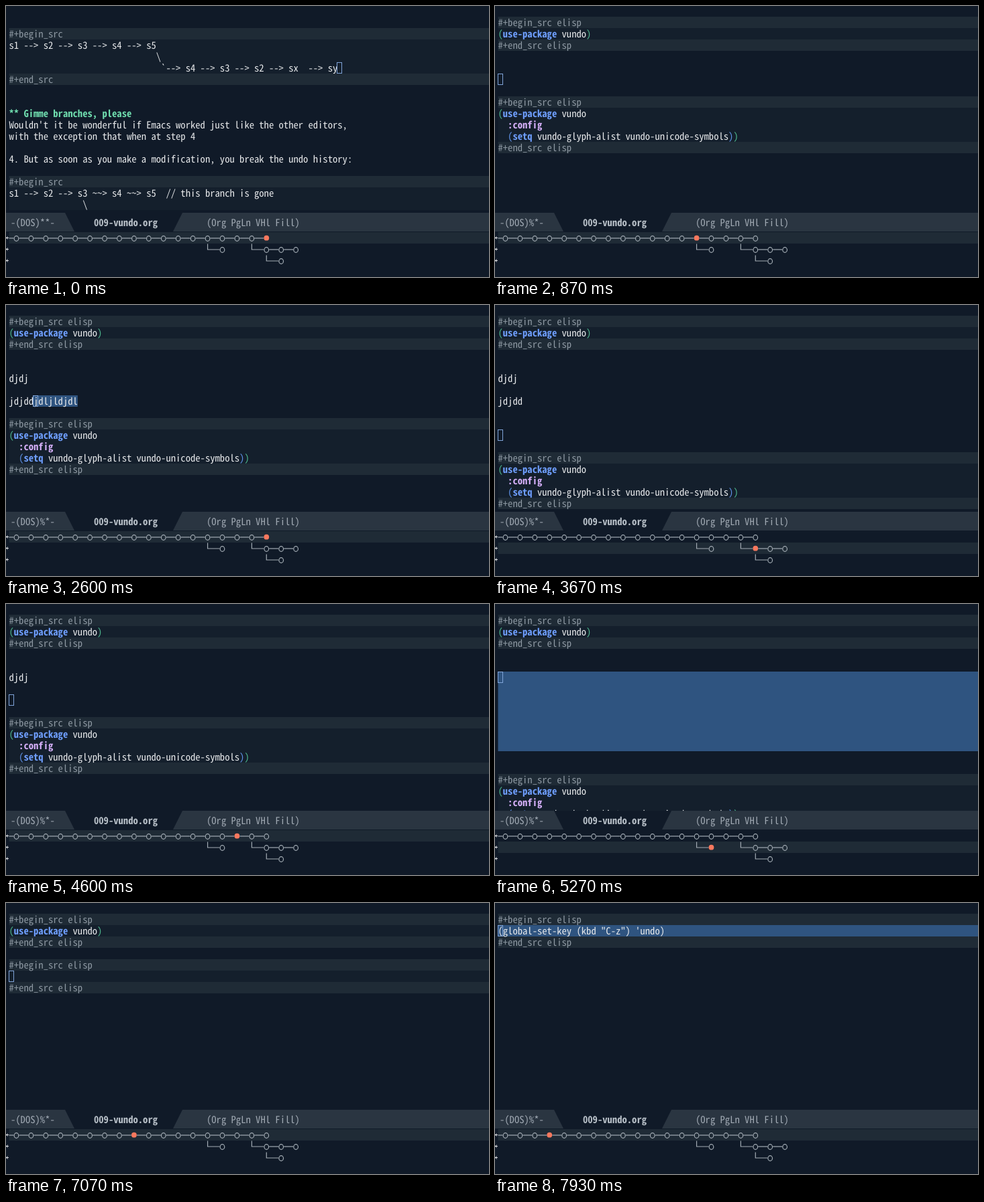
Write an HTML page with a canvas that moves like this. It is 720 px wide and 405 px high and loops after 8000 ms.

```html
<!DOCTYPE html>
<html lang="en">
<head>
<meta charset="utf-8">
<title>Undo tree</title>
<style>
  html, body { margin: 0; width: 100%; height: 100%; overflow: hidden; background: #101a28; }
  canvas { display: block; width: 720px; height: 405px; }
</style>
</head>
<body>
<canvas id="stage" width="720" height="405"></canvas>
<script>
const ctx = document.getElementById('stage').getContext('2d');
const LOOP = 8000, CHAR = 7.31, LEFT = 4.5, LINE = 17, TREE_TOP = 338;
const COLOR = {
  back: '#101a28', band: '#1f2b36', body: '#141f2c', mark: '#2f5480', bar: '#2a3541',
  text: '#e6e8ea', dim: '#8d98a2', label: '#a0a9b3', name: '#b8c0c8', head: '#6fdcae',
  keyword: '#6f9fff', option: '#d6b0fa', outer: '#4cb58c', inner: '#5f93e8',
  cursor: '#7fa3d8', line: '#a3acb4', current: '#f8785e'
};

// Size the font so that one cell is exactly CHAR wide.
const FAMILY = '"Noto Sans Mono CJK JP", "Noto Sans Mono CJK SC", "Noto Sans Mono", monospace';
ctx.font = `100px ${FAMILY}`;
const fontSize = 100 * CHAR / ctx.measureText('0').width;
ctx.textRendering = 'geometricPrecision';

const blank = n => Array(n).fill('');
const block = (...body) => ['#+begin_src elisp', ...body, '#+end_src elisp'];
const first = ['', ...block('(use-package vundo)')];
const config = block('(use-package vundo', '  :config',
  '  (setq vundo-glyph-alist vundo-unicode-symbols))');
const page = (...gap) => [...first, ...gap, ...config];

const intro = [
  '', '', '#+begin_src', 's1 --> s2 --> s3 --> s4 --> s5', ' '.repeat(30) + '\\',
  ' '.repeat(31) + '`--> s4 --> s3 --> s2 --> sx  --> sy', '#+end_src', '', '',
  '** Gimme branches, please',
  "Wouldn't it be wonderful if Emacs worked just like the other editors,",
  'with the exception that when at step 4', '',
  '4. But as soon as you make a modification, you break the undo history:', '',
  '#+begin_src', 's1 --> s2 --> s3 ~~> s4 ~~> s5  // this branch is gone', ' '.repeat(15) + '\\'
];
const spaced = page(...blank(4));
const oneWord = page('', '', 'djdj', '', '', '');
const twoWords = page('', '', 'djdj', '', 'jdjdd', '');
const longWord = page('', '', 'djdj', '', 'jdjddjdljldjdl', '');
const branch = page('', '', 'djdj', '', 'jdjdd', ...blank(4));
const branchMore = page('', '', 'djdj', '', 'jdjdd', ...blank(6));

// [start ms, tree column, tree row, lines, cursor [row, col], inserted region [row, col, row, col]]
const steps = [
  [0, 17, 0, intro, [5, 67]],
  [66, 16, 0, twoWords, [8, 5]],
  [268, 15, 0, oneWord, [8, 0]],
  [530, 14, 0, spaced, [6, 0]],
  [800, 13, 0, spaced, [6, 0]],
  [1130, 14, 0, spaced, [6, 0]],
  [1400, 15, 0, oneWord, [6, 4], [6, 0, 8, 0]],
  [1800, 16, 0, twoWords, [8, 0], [8, 0, 8, 5]],
  [2330, 17, 0, longWord, [8, 5], [8, 5, 8, 14]],
  [2800, 17, 1, branch, [8, 5], [8, 5, 11, 0]],
  [3070, 18, 1, branchMore, [11, 0], [11, 0, 13, 0]],
  [3470, 17, 1, branch, [11, 0]],
  [3870, 16, 0, twoWords, [8, 5]],
  [4270, 15, 0, oneWord, [8, 0]],
  [4870, 14, 0, spaced, [6, 0]],
  [5130, 14, 1, page(...blank(11)), [6, 0], [6, 0, 13, 0]],
  [5530, 13, 0, spaced, [6, 0]],
  [5870, 12, 0, page(...blank(2)), [4, 0]],
  [6300, 11, 0, page(''), [4, 0]],
  [6500, 10, 0, [...first, '', ...block('(use-package vundo', '  :config', '  )')], [8, 2]],
  [6700, 9, 0, [...first, '', ...block('(use-package vundo)')], [6, 18]],
  [6900, 8, 0, [...first, '', ...block('')], [6, 0]],
  [7100, 7, 0, first, [4, 0]],
  [7300, 6, 0, ['', ...block('(use-package )')], [2, 13]],
  [7500, 5, 0, ['', ...block('')], [2, 0]],
  [7700, 4, 0, ['', ...block()], [2, 0]],
  [7900, 3, 0, ['', ...block('(global-set-key (kbd "C-z") \'undo)')], [2, 0], [2, 0, 3, 0]]
];

const colX = col => LEFT + col * CHAR;
const rowY = row => row * LINE - 1;

function fill(color, x, y, w, h) {
  ctx.fillStyle = color;
  ctx.fillRect(x, y, w, h);
}

function write(text, x, baseline, color, bold) {
  ctx.font = `${bold ? 'bold ' : ''}${fontSize}px ${FAMILY}`;
  ctx.fillStyle = color;
  [...text].forEach((c, i) => c !== ' ' && ctx.fillText(c, x + i * CHAR, baseline));
}

function writeCode(text, baseline, depth) {
  let col = 0;
  for (const token of text.match(/use-package|setq|:config|[()]|[^():]/g) || []) {
    let color = COLOR.text, bold = false;
    if (token === '(') color = depth++ ? COLOR.inner : COLOR.outer;
    else if (token === ')') color = --depth ? COLOR.inner : COLOR.outer;
    else if (token === ':config') { color = COLOR.option; bold = true; }
    else if (token.length > 1) { color = COLOR.keyword; bold = true; }
    write(token, colX(col), baseline, color, bold);
    col += token.length;
  }
  return depth;
}

function drawMark([startRow, startCol, endRow, endCol]) {
  for (let row = startRow; row <= endRow; row++) {
    const x = colX(row === startRow ? startCol : 0);
    const right = row === endRow ? colX(endCol) : 720;
    if (right > x) fill(COLOR.mark, x, rowY(row), right - x, LINE);
  }
}

function drawBuffer(lines, cursor, mark) {
  const kinds = [];
  let inBlock = false;
  lines.forEach((text, row) => {
    const edge = text.startsWith('#+');
    if (edge) inBlock = text.startsWith('#+begin');
    kinds[row] = edge ? 'band' : inBlock ? 'body' : 'back';
    if (kinds[row] !== 'back') fill(COLOR[kinds[row]], LEFT, rowY(row), 720 - LEFT, LINE);
  });
  if (mark) drawMark(mark);

  let depth = 0;
  lines.forEach((text, row) => {
    const baseline = rowY(row) + 13.5;
    const marked = mark && row >= mark[0] && row < mark[2];
    if (kinds[row] === 'band') {
      depth = 0;
      write(text, LEFT, baseline, COLOR.dim);
    } else if (text.startsWith('** ')) write(text, LEFT, baseline, COLOR.head, true);
    else if (kinds[row] === 'body' && !marked) depth = writeCode(text, baseline, depth);
    else write(text, LEFT, baseline, COLOR.text);
  });

  ctx.strokeStyle = COLOR.cursor;
  ctx.lineWidth = 1;
  ctx.strokeRect(Math.round(colX(cursor[1])) - 0.5, rowY(cursor[0]) + 0.5, 7, LINE - 1);
}

function drawModeLine(status) {
  fill(COLOR.bar, 0, 309, 720, 28);
  ctx.fillStyle = COLOR.back;
  ctx.beginPath();
  ctx.moveTo(88, 309);
  ctx.lineTo(263, 309);
  ctx.lineTo(249, 337);
  ctx.lineTo(102, 337);
  ctx.fill();
  write(status, 7, 329, COLOR.label);
  write('009-vundo.org', 131, 329, COLOR.name, true);
  write('(Org PgLn VHl Fill)', 299, 329, COLOR.label);
}

function drawTree(currentCol, currentRow) {
  const nodeX = col => colX(3 * col + 1.5);
  const nodeY = row => TREE_TOP + LINE * (row + 0.5) + 0.5;
  const path = (...points) => {
    ctx.beginPath();
    points.forEach(([x, y]) => ctx.lineTo(x, y));
    ctx.stroke();
  };
  fill(COLOR.back, 0, 337, 720, 68);
  fill(COLOR.band, LEFT, TREE_TOP + currentRow * LINE, 720 - LEFT, LINE);

  // Each branch: [row, parent column, last column]; the trunk has no parent.
  for (const [row, parent, last] of [[0, -1, 17], [1, 13, 14], [1, 16, 19], [2, 17, 18]]) {
    const y = nodeY(row);
    ctx.strokeStyle = COLOR.line;
    ctx.lineWidth = 1.2;
    if (parent >= 0) path([nodeX(parent), y - 8.5], [nodeX(parent), y], [nodeX(parent + 1) - 4, y]);
    else path([LEFT, y], [nodeX(0) - 4, y]);
    for (let col = parent + 1; col <= last; col++) {
      if (col < last) path([nodeX(col) + 4, y], [nodeX(col + 1) - 4, y]);
      ctx.beginPath();
      ctx.ellipse(nodeX(col), y + 0.5, 3.3, 3.8, 0, 0, 2 * Math.PI);
      if (col === currentCol && row === currentRow) {
        ctx.beginPath();
        ctx.arc(nodeX(col), y - 0.3, 3.9, 0, 2 * Math.PI);
        ctx.fillStyle = COLOR.current;
        ctx.fill();
      } else ctx.stroke();
    }
  }
  ctx.strokeStyle = COLOR.text;
  ctx.lineWidth = 1;
  for (let row = 0; row < 3; row++) {
    const y = nodeY(row) - 0.5;
    path([2.5, y - 2], [0.5, y], [2.5, y + 2]);
    path([0.5, y], [4, y]);
  }
}

function frame() {
  const time = performance.now() % LOOP;
  const [start, col, row, lines, cursor, mark] = steps.findLast(step => step[0] <= time);
  fill(COLOR.back, 0, 0, 720, 405);
  drawBuffer(lines, cursor, mark);
  drawModeLine(start ? '-(DOS)%*-' : '-(DOS)**-');
  drawTree(col, row);
  requestAnimationFrame(frame);
}
frame();
</script>
</body>
</html>
```
